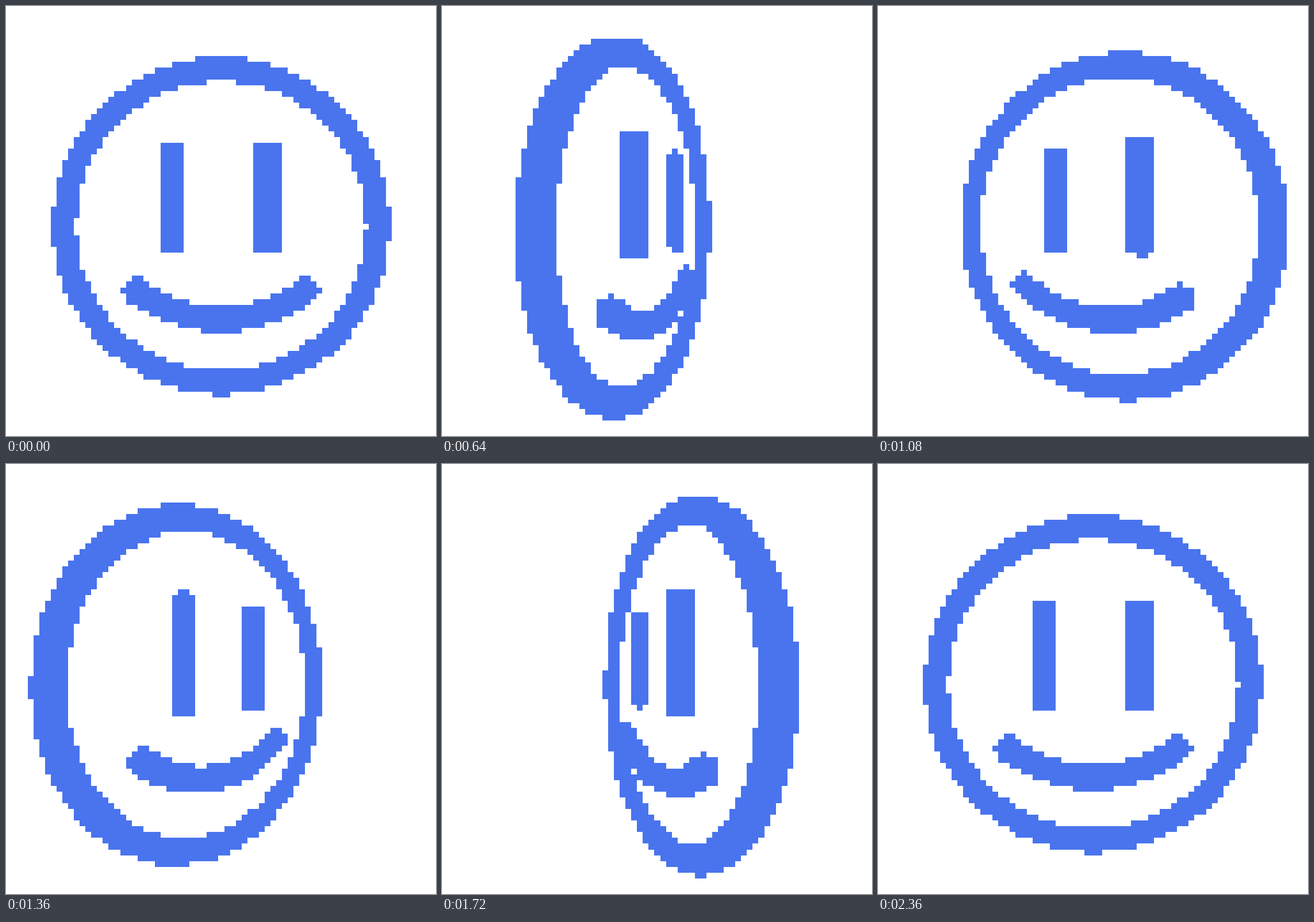
An HTML page with a canvas that plays this animation: 748x748 px, repeating every 2.4 s.

```html
<!DOCTYPE html>
<html lang="en">
<head>
<meta charset="utf-8">
<title>Spinning pixel smiley</title>
<style>
  html, body { margin: 0; width: 100%; height: 100%; overflow: hidden; background: #fff; }
  canvas { display: block; width: 748px; height: 748px; }
</style>
</head>
<body>
<canvas id="stage" width="748" height="748"></canvas>
<script>
const ctx = document.getElementById('stage').getContext('2d');
const STEP = 40, COUNT = 60;          // ms per pose, poses per loop
const N = 76, CELL = 10.055;          // pixel grid
const FOCAL = 56, DIST = 55.7;        // camera, in cells
const SIDES = 20;
const RAD = Math.PI / 180;
const edgeX = k => Math.round(7.5 + CELL * k);
const edgeY = k => Math.round(6.9 + CELL * k);

// A tube is a list of circular sections, each lying in the plane of (ux, uy) and z.
function tube(z, steps, section) {
  return Array.from({ length: steps + 1 }, (_, i) => {
    const [x, y, ux, uy, r] = section(i / steps);
    return Array.from({ length: SIDES }, (_, j) => {
      const b = j / SIDES * 2 * Math.PI, d = r * Math.cos(b);
      return [x + d * ux - 0.1, y + d * uy, z + r * Math.sin(b)];
    });
  });
}

// Arc around the lowest point, reaching `half` degrees to each side, with round ends.
function arc(r, cy, z, radius, half) {
  const cap = r / radius / RAD;
  return tube(z, 120, k => {
    const a = (half + cap) * (2 * k - 1);
    const over = Math.min(1, Math.max(0, Math.abs(a) - half) / cap);
    const ux = Math.sin(a * RAD), uy = Math.cos(a * RAD);
    return [radius * ux, cy + radius * uy, ux, uy, r * Math.sqrt(1 - over * over)];
  });
}

const eye = x => tube(0.1, 1, k => [x, -13.05 + 18.5 * k, 1, 0, 2.08]);

const face = [
  arc(1.885, 0.86, -0.3, 27.09, 180),
  arc(2.13, -7.9, 0.1, 24.7, 36.6),
  eye(-8.05),
  eye(8.05)
];

const grid = new Uint8Array(N * N);

function fillTriangle(a, b, c) {
  const area = (b[0] - a[0]) * (c[1] - a[1]) - (b[1] - a[1]) * (c[0] - a[0]);
  if (area < 0) [b, c] = [c, b];
  const inside = (p, q, x, y) =>
    (q[0] - p[0]) * (y - p[1]) - (q[1] - p[1]) * (x - p[0]) >= 0;
  const lo = i => Math.max(0, Math.ceil(Math.min(a[i], b[i], c[i]) - 0.5));
  const hi = i => Math.min(N - 1, Math.floor(Math.max(a[i], b[i], c[i]) - 0.5));
  const x1 = hi(0), y1 = hi(1);
  for (let row = lo(1); row <= y1; row++) {
    for (let col = lo(0); col <= x1; col++) {
      const x = col + 0.5, y = row + 0.5;
      if (inside(a, b, x, y) && inside(b, c, x, y) && inside(c, a, x, y)) grid[row * N + col] = 1;
    }
  }
}

function draw(angle) {
  const c = Math.cos(angle), s = Math.sin(angle);
  const project = ([x, y, z]) => {
    const k = FOCAL / (DIST + x * s - z * c);
    return [36.57 + k * (x * c + z * s), 36.5 + k * y];
  };
  grid.fill(0);
  for (const part of face) {
    const rings = part.map(ring => ring.map(project));
    for (let i = 1; i < rings.length; i++) {
      const p = rings[i - 1], q = rings[i];
      for (let j = 0; j < SIDES; j++) {
        const n = (j + 1) % SIDES;
        fillTriangle(p[j], p[n], q[j]);
        fillTriangle(p[n], q[n], q[j]);
      }
    }
  }

  ctx.fillStyle = '#fff';
  ctx.fillRect(0, 0, 748, 748);
  ctx.fillStyle = '#4974ee';
  for (let row = 0; row < N; row++) {
    const y = edgeY(row), h = edgeY(row + 1) - y;
    for (let col = 0; col < N; col++) {
      if (!grid[row * N + col]) continue;
      const x = edgeX(col);
      ctx.fillRect(x, y, edgeX(col + 1) - x, h);
    }
  }
}

let shown = -1;
function tick(now) {
  const pose = Math.floor(now / STEP) % COUNT;
  if (pose !== shown) {
    shown = pose;
    const u = pose / (COUNT - 1);
    draw(2 * Math.PI * u * u * (3 - 2 * u));
  }
  requestAnimationFrame(tick);
}
tick(performance.now());
</script>
</body>
</html>
```
